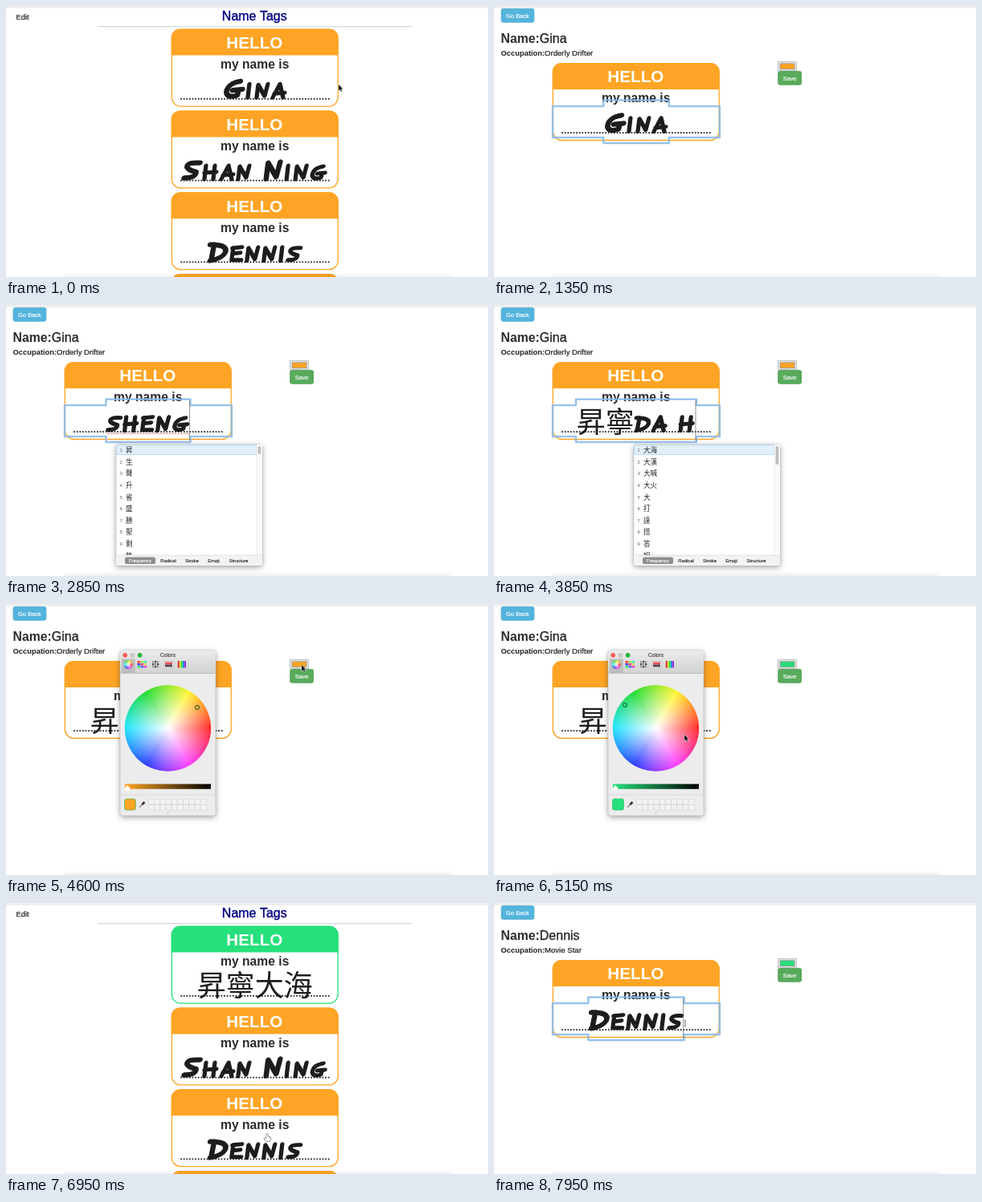
Animation, 600 px wide and 338 px high, one loop 8 s. Source, as an HTML page with a canvas:

```html
<!DOCTYPE html>
<html lang="en">
<head>
<meta charset="utf-8">
<title>Name Tags</title>
<style>
html, body { margin: 0; width: 100%; height: 100%; overflow: hidden; background: #fff; }
canvas { display: block; width: 600px; height: 338px; }
</style>
</head>
<body>
<canvas id="stage"></canvas>
<script>
const canvas = document.getElementById('stage');
const c = canvas.getContext('2d');
const ratio = window.devicePixelRatio || 1;
canvas.width = 600 * ratio;
canvas.height = 338 * ratio;

const LOOP = 8000, STEP = 50;
const ORANGE = '#ffa424', GREEN = '#26e07b', INK = '#1d1d20';
const SANS = '"Liberation Sans", sans-serif';
const CJK = '"Noto Sans CJK TC", "Noto Sans CJK", sans-serif';
const FIRST = 'Gina', SECOND = 'Shan Ning', THIRD = 'Dennis', RENAMED = '昇寧大海';

// Marker letters on a 20 unit high body: [advance, path]
const MARKER = {
  S: [19, 'M17-17Q4-18 4-13Q5-10 13-8Q13-2 1-2'],
  H: [22, 'M5-18L3-1M16-18L14-1M3-9L18-10'],
  E: [19, 'M5-17L3-2M4-17L16-18M4-10L14-11M3-2L15-2'],
  N: [21, 'M3-1L5-17L13-3L17-18'],
  G: [22, 'M17-17Q4-15 3-6Q4 0 14-3L15-8M9-8L19-9'],
  D: [21, 'M6-17L3-2M2-17Q20-17 17-9Q14-3 2-1'],
  A: [20, 'M2-1L11-18L15-1M4-6L17-7'],
  I: [11, 'M5-18L3-1']
};
for (const k in MARKER) MARKER[k][1] = new Path2D(MARKER[k][1]);

// [time, text, length of the part being composed, panel x]
const TYPING = [
  [0, FIRST], [1500, 'Gin'], [1600, 'Gi'], [1700, 'G'], [1800, ''],
  [2000, 's', 1, 165], [2100, 'sh', 2, 156], [2200, 'she', 3, 147],
  [2350, 'shen', 4, 137], [2500, 'sheng', 5, 137], [3000, '昇'],
  [3100, '昇n', 1, 184], [3200, '昇ni', 2, 178], [3300, '昇nin', 3, 168],
  [3400, '昇ning', 4, 158], [3500, '昇寧'],
  [3600, '昇寧d', 1, 200], [3700, '昇寧da', 2, 190], [3800, '昇寧da h', 4, 174],
  [3950, '昇寧da ha', 5, 166], [4050, '昇寧da hai', 6, 160], [4150, RENAMED]
];
const CANDIDATES = {
  s: [...'昇生聲升省盛勝聖剩牲'],
  n: [...'寧凝擰檸嚀獰佞濘甯聹'],
  d: ['大海', '大漢', '大喊', '大火', ...'大打達搭答妲']
};

// [time, x, y]
const POINTER = [
  [0, 414, 98], [200, 414, 98], [500, 330, 102], [700, 330, 102], [1050, 219, 150],
  [4200, 260, 140], [4400, 368, 76], [4600, 368, 76], [4850, 163, 126],
  [5000, 163, 126], [5150, 237, 163], [5400, 148, 64], [5500, 148, 64],
  [5800, 377, 94], [6050, 377, 94], [6300, 30, 12], [6450, 30, 12],
  [6800, 325, 288], [7100, 325, 288], [7400, 238, 150]
];

function box(x, y, w, h, fill, r = 0, stroke, line = 1) {
  c.beginPath();
  c.roundRect(x, y, w, h, r);
  if (fill) { c.fillStyle = fill; c.fill(); }
  if (stroke) { c.strokeStyle = stroke; c.lineWidth = line; c.stroke(); }
}

function disc(x, y, r, fill) {
  c.beginPath();
  c.arc(x, y, r, 0, 7);
  c.fillStyle = fill;
  c.fill();
}

function line(x1, y1, x2, y2, color, width = 1) {
  c.beginPath();
  c.moveTo(x1, y1);
  c.lineTo(x2, y2);
  c.strokeStyle = color;
  c.lineWidth = width;
  c.stroke();
}

function label(s, x, y, size, color, { bold = '', align = 'left', font = SANS } = {}) {
  c.font = `${bold} ${size}px ${font}`;
  c.textAlign = align;
  c.fillStyle = color;
  c.fillText(s, x, y);
  if (font === SANS && !bold) {
    // A hairline gives plain text its slightly heavier look
    c.strokeStyle = color;
    c.lineWidth = size * 0.025;
    c.strokeText(s, x, y);
  }
}

function ramp(x1, y1, x2, y2, ...colors) {
  const g = c.createLinearGradient(x1, y1, x2, y2);
  colors.forEach((k, i) => g.addColorStop(i / (colors.length - 1), k));
  return g;
}

function dots(x1, x2, y, color, size) {
  c.setLineDash([size, size]);
  line(x1, y, x2, y, color, size);
  c.setLineDash([]);
}

function advance(ch) {
  const m = MARKER[ch.toUpperCase()];
  if (m) return m[0] * (MARKER[ch] ? 1.25 : 1);
  return ch === ' ' ? 13 : 36;
}

const widthOf = s => [...s].reduce((w, ch) => w + advance(ch), 0);

function drawName(s, cx, base) {
  let x = cx - widthOf(s) / 2;
  for (const ch of s) {
    const m = MARKER[ch.toUpperCase()];
    if (m) {
      const k = MARKER[ch] ? 1.25 : 1;
      c.save();
      c.translate(x, base);
      c.scale(k, k);
      c.strokeStyle = INK;
      c.lineWidth = 4.3;
      c.lineCap = c.lineJoin = 'round';
      c.stroke(m[1]);
      c.translate(1, -0.7);
      c.stroke(m[1]);
      c.restore();
    } else if (ch !== ' ') {
      label(ch, x, base + 0.8, 36, INK, { font: CJK });
    }
    x += advance(ch);
  }
}

function drawTag(x, y, color, name) {
  box(x + 0.7, y + 0.7, 206.8, 95.8, '#fff', 11, color, 1.3);
  box(x, y, 208, 33, color, [11, 11, 0, 0]);
  label('HELLO', x + 103.7, y + 24.3, 20.7, '#fff', { bold: 'bold', align: 'center' });
  label('my name is', x + 104, y + 49.4, 15.7, '#2b2b2e', { bold: 'bold', align: 'center' });
  dots(x + 11.5, x + 197, y + 87.2, '#222', 1.8);
  drawName(name, x + 104, y + 87);
}

function drawList(renamed) {
  label('Edit', 12.5, 16.7, 9.4, '#222');
  label('Name Tags', 309.3, 17.6, 16, '#000080', { align: 'center' });
  line(114, 25.7, 505, 25.7, '#c9c9d0', 0.9);
  drawTag(205.7, 28.6, renamed ? GREEN : ORANGE, renamed ? RENAMED : FIRST);
  drawTag(205.7, 130.4, ORANGE, SECOND);
  drawTag(205.7, 232.2, ORANGE, THIRD);
  drawTag(205.7, 334, ORANGE, '');
}

function button(s, x, y, w, h, fill, edge) {
  box(x + 0.4, y + 0.4, w - 0.8, h - 0.8, fill, 2.2, edge, 0.8);
  label(s, x + w / 2, y + h / 2 + 2.7, 7.5, '#fff', { align: 'center' });
}

function drawFocus(name, caret) {
  const half = Math.max(2, widthOf(name) / 2 + 1);
  const l = 177 - half, r = 177 + half;
  const edge = [[73, 125], [l, 125], [l, 117.5], [r, 117.5], [r, 125], [281, 125],
    [281, 164], [r, 164], [r, 171], [l, 171], [l, 164], [73, 164]];
  c.beginPath();
  edge.forEach(p => c.lineTo(...p));
  c.closePath();
  c.lineJoin = 'round';
  c.strokeStyle = 'rgba(120,180,240,.35)';
  c.lineWidth = 3;
  c.stroke();
  c.strokeStyle = '#86b9e8';
  c.lineWidth = 1.6;
  c.stroke();
  if (caret) line(r - 1, 119, r - 1, 169, '#777', 0.8);
}

function drawDetail(p) {
  button('Go Back', 8.7, 3, 41.5, 17.7, '#54b4dc', '#46a8d0');
  label('Name:', 8.5, 45.6, 15.8, '#2b2b2e', { bold: 'bold' });
  label(p.person, 56.8, 45.6, 16, '#2b2b2e');
  label('Occupation:', 8.5, 62.2, 9.4, '#222', { bold: 'bold' });
  label(p.job, 63, 62.2, 9.6, '#222');
  drawTag(72.7, 71, p.color, p.name);
  if (p.focus) drawFocus(p.name, p.caret);
  box(353.6, 69.4, 22.8, 11.4, '#e6e6e6', 0, '#b0b0b0', 0.8);
  box(356.2, 71.8, 17.8, 6.8, p.swatch, 0, '#888', 0.7);
  button('Save', 353.3, 81, 29.8, 17.6, p.hover ? '#449648' : '#58ab5c', p.hover ? '#357a38' : '#4a9c4e');
}

function shadowBox(x, y, w, h, fill, r) {
  c.save();
  c.shadowColor = 'rgba(0,0,0,.38)';
  c.shadowBlur = 7 * ratio;
  c.shadowOffsetY = 2 * ratio;
  box(x, y, w, h, fill, r);
  c.restore();
  box(x, y, w, h, null, r, '#bdbdbd', 0.6);
}

function drawPanel(x, key) {
  shadowBox(x, 174, 182, 151, '#fff', 2);
  c.save();
  c.beginPath();
  c.rect(x, 174, 182, 138);
  c.clip();
  box(x + 0.5, 174.6, 174.5, 12, '#e1effb', 0, '#aed2f0', 0.8);
  CANDIDATES[key].forEach((word, i) => {
    const y = 181 + i * 14.6;
    if (i < 9) label(i + 1, x + 4.5, y + 2.2, 6, '#8a8a8a');
    label(word, x + 12, y + 3.2, 8.6, '#222', { font: CJK });
  });
  box(x + 175, 174, 7, 138, '#fafafa');
  line(x + 175, 174, x + 175, 312, '#e8e8e8', 0.6);
  box(x + 176.6, 176, 3.6, key === 'd' ? 23 : 10, '#bcbcbc', 1.8);
  c.restore();
  box(x, 312, 182, 13, '#f3f3f3', [0, 0, 2, 2]);
  line(x, 312, x + 182, 312, '#d4d4d4', 0.6);
  box(x + 11, 314.6, 38, 8.4, '#8e8e8e', 2);
  const tabs = [['Frequency', 30], ['Radical', 65], ['Stroke', 94.5], ['Emoji', 121.5], ['Structure', 152.5]];
  tabs.forEach(([s, dx], i) =>
    label(s, x + dx, 320.8, 5.9, i ? '#222' : '#fff', { align: 'center' }));
}

function drawWheel(x, y, r) {
  const hue = c.createConicGradient(0, x, y);
  ['#ff2a2a', '#ff40ff', '#2a3cff', '#20e4ff', '#24dc30', '#fff630', '#ff2a2a']
    .forEach((k, i) => hue.addColorStop(i / 6, k));
  disc(x, y, r, hue);
  const white = c.createRadialGradient(x, y, 0, x, y, r);
  white.addColorStop(0, '#fff');
  white.addColorStop(1, 'rgba(255,255,255,0)');
  disc(x, y, r, white);
}

function drawPicker(picked) {
  const color = picked ? GREEN : ORANGE;
  shadowBox(142, 58, 119, 206, '#ececec', 3);
  box(142, 58, 119, 28.5, ramp(0, 58, 0, 86, '#ebebeb', '#d2d2d2'), [3, 3, 0, 0]);
  line(142, 86.5, 261, 86.5, '#b4b4b4', 0.7);
  ['#f95f57', '#c9c9c9', '#2ab13c'].forEach((k, i) => disc(148.2 + i * 9.2, 63.8, 2.9, k));
  label('Colors', 201.5, 66.2, 6.6, '#444', { align: 'center' });

  box(144, 68.5, 16.5, 18, '#bcbcbc');
  drawWheel(152.2, 75.5, 5.4);
  for (let i = 0; i < 9; i++) {
    const col = i % 3, row = i / 3 | 0;
    box(163.5 + col * 4, 71 + row * 3, 3.6, 2.6, `hsl(${i * 83},75%,58%)`);
    box(182 + col * 3, 71 + row * 3, 2.3, 2.3, i % 2 ? '#444' : '#999');
  }
  box(197, 71.5, 11, 8.5, '#fff', 0, '#999', 0.5);
  box(198, 72.5, 9, 3, '#e4515e');
  box(198, 75.5, 9, 3, '#55434a');
  for (let i = 0; i < 5; i++) box(213.8 + i * 2.1, 71, 1.9, 8.5, `hsl(${i * 70},75%,50%)`);

  drawWheel(201.5, 155, 53.7);
  const [mx, my] = picked ? [163, 126] : [238, 129];
  box(mx - 2.6, my - 2.6, 5.2, 5.2, color, 2.6, '#17632e', 1);

  box(148, 224.6, 107, 6.2, ramp(148, 0, 255, 0, color, '#000'));
  c.beginPath();
  c.moveTo(151.2, 226);
  c.lineTo(154.2, 229.2);
  c.lineTo(154.2, 232.4);
  c.lineTo(148.2, 232.4);
  c.lineTo(148.2, 229.2);
  c.closePath();
  c.fillStyle = '#fff';
  c.fill();
  line(142, 238, 261, 238, '#cdcdcd', 0.7);
  box(147.5, 243, 14, 14, color, 2.5, '#22b866', 0.6);
  line(166, 253.5, 170.5, 249, '#888', 1.4);
  line(169.5, 250, 172.5, 247, '#333', 2.6);
  for (let i = 0; i < 20; i++)
    box(177.5 + i % 10 * 7.2, 243.3 + (i / 10 | 0) * 7.1, 6.8, 6.6, '#f3f3f3', 0.8, '#d0d0d0', 0.6);
  disc(201.5, 261, 0.8, '#aaa');
}

const ARROW = new Path2D('M0 0L0 7.6L1.8 6L3 8.8L4.2 8.2L3 5.6L5.4 5.4Z');
const HAND = new Path2D('M-.7 0L.7 0L.9 3L4 4L4 7L3 9.4L-1 9.4L-3.6 6L-2.6 5L-1 6Z');

function drawPointer(x, y, kind) {
  c.save();
  c.translate(x, y);
  if (kind === 'beam') {
    line(0, -3.5, 0, 3.5, '#555', 0.8);
    line(-1.3, -3.7, 1.3, -3.7, '#555', 0.7);
    line(-1.3, 3.7, 1.3, 3.7, '#555', 0.7);
  } else {
    const hand = kind === 'hand';
    const path = hand ? HAND : ARROW;
    c.lineJoin = 'round';
    c.lineWidth = 1;
    c.strokeStyle = hand ? '#222' : '#fff';
    c.stroke(path);
    c.fillStyle = hand ? '#fff' : '#111';
    c.fill(path);
  }
  c.restore();
}

function pointerAt(t) {
  const i = POINTER.findLastIndex(p => p[0] <= t);
  const a = POINTER[i], b = POINTER[i + 1] || a;
  const u = b === a ? 0 : (t - a[0]) / (b[0] - a[0]);
  const e = u * u * (3 - 2 * u);
  return [a[1] + (b[1] - a[1]) * e, a[2] + (b[2] - a[2]) * e];
}

function pointerKind(x, y, list, open) {
  if (open) return 'arrow';
  const within = (l, top, r, bottom) => x > l && x < r && y > top && y < bottom;
  if (list) return within(206, 29, 413, 338) ? 'hand' : 'arrow';
  if (within(353, 81, 384, 99) || within(8, 3, 50, 21)) return 'hand';
  return within(73, 120, 281, 168) ? 'beam' : 'arrow';
}

function render(t) {
  c.setTransform(ratio, 0, 0, ratio, 0, 0);
  c.fillStyle = '#fff';
  c.fillRect(0, 0, 600, 338);
  box(0, 0, 600, 2, '#f3f3f3');
  line(0, 2, 600, 2, '#dedede', 0.8);

  const list = t < 700 || (t >= 6450 && t < 7100);
  const open = t >= 4550 && t < 5500;
  const picked = t >= 4900;
  const [px, py] = pointerAt(t);

  if (list) {
    drawList(t > 5000);
  } else if (t < 6450) {
    const [, name, composed, panelX] = TYPING.findLast(s => s[0] <= t);
    drawDetail({
      person: FIRST, job: 'Orderly Drifter', name,
      color: t >= 5500 ? GREEN : ORANGE,
      swatch: picked ? GREEN : ORANGE,
      focus: t >= 1100 && t < 4400,
      caret: t < 1300 || t >= 1500,
      hover: t > 5500 && px > 353 && py > 81 && py < 99
    });
    if (composed) {
      const right = 177 + widthOf(name) / 2;
      const start = right - widthOf(name.slice(-composed));
      if (name.length === composed) dots(start, right, 160.6, '#e0463c', 1);
      drawPanel(panelX, name.slice(-composed)[0]);
    }
    if (open) drawPicker(picked);
  } else {
    drawDetail({
      person: THIRD, job: 'Movie Star', name: THIRD, color: ORANGE,
      swatch: GREEN, focus: t >= 7450, caret: true
    });
  }

  box(73, 332, 482, 6, ramp(0, 332, 0, 338, 'rgba(0,0,0,0)', 'rgba(0,0,0,.06)'));
  if (t < 1250 || t >= 4200) drawPointer(px, py, pointerKind(px, py, list, open));
}

function tick() {
  const t = performance.now() % LOOP;
  render(Math.floor(t / STEP) * STEP);
  requestAnimationFrame(tick);
}
tick();
</script>
</body>
</html>
```
